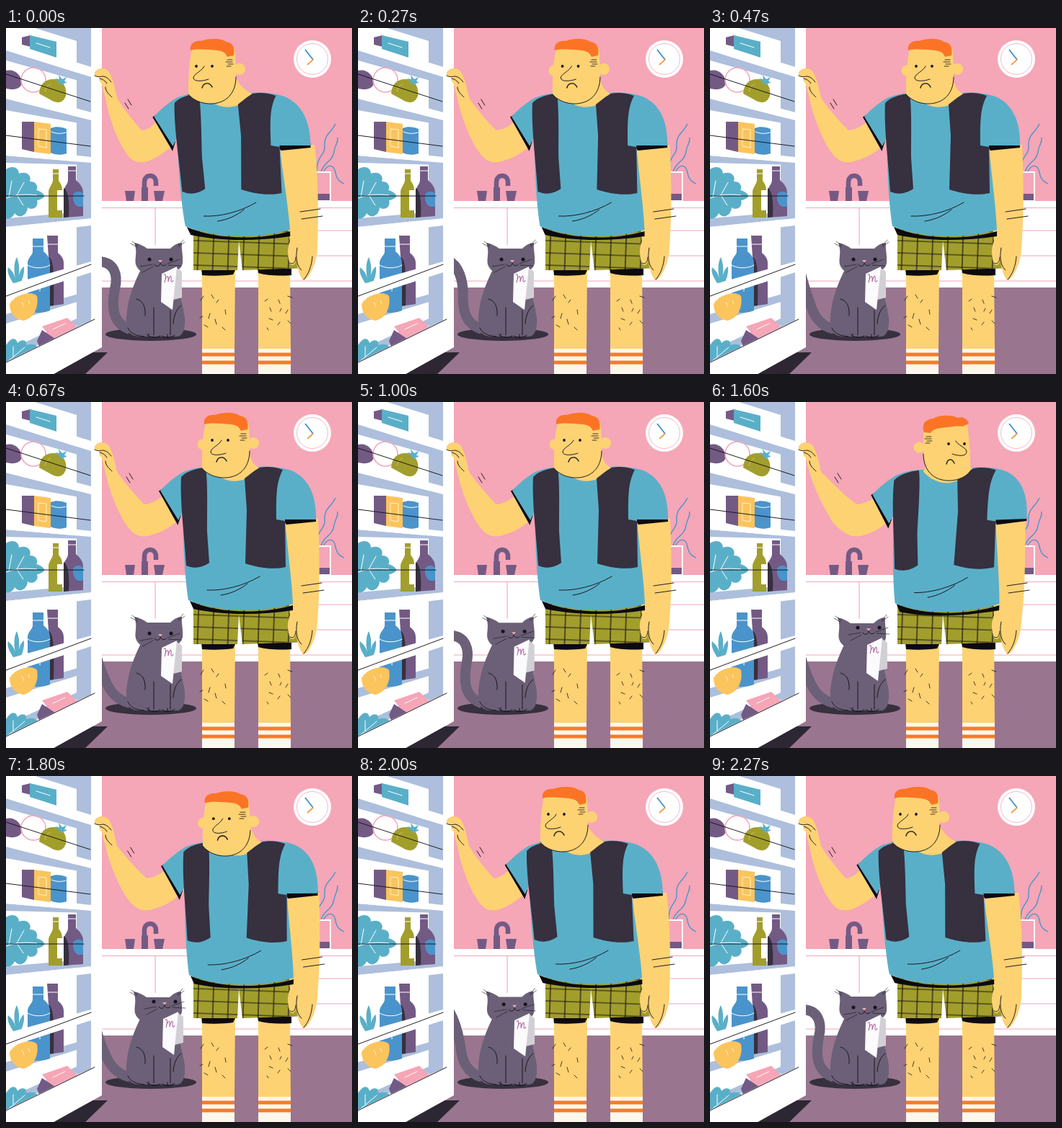
Write an HTML page that moves like this. It is 480 by 480 pixels and loops after 2.34 s.

```html
<!DOCTYPE html>
<html lang="en">
<head>
<meta charset="utf-8">
<title>Kitchen</title>
<style>
  html, body { margin: 0; width: 100%; height: 100%; overflow: hidden; background: #f5a6b7; }
  svg { display: block; width: 100vw; height: 100vh; }
  .ink { fill: none; stroke: #17131b; stroke-width: .95; stroke-linecap: round; stroke-linejoin: round; }
  .skin { fill: #fdd273; }
  .teal { fill: #5aafc8; }
  .dark { fill: #36303f; }
  .plum { fill: #735a85; }
  .olive { fill: #a29e2c; }
  .blue { fill: #4a94cb; }
  .ice { fill: #adbfdc; }
  .fur { fill: #6b6077; }
  .white { fill: #fff; }
  .pinkline { fill: none; stroke: #f5a6b7; stroke-width: 1.1; }
  .whiteline { fill: none; stroke: #fff; stroke-width: 1; stroke-linecap: round; }
</style>
</head>
<body>
<svg viewBox="0 0 480 480">
  <defs>
    <pattern id="plaid" width="21" height="17" patternUnits="userSpaceOnUse" patternTransform="translate(264 294) rotate(2)">
      <rect width="21" height="17" fill="#a29e2c"/>
      <path d="M0,1H21M3,0V17" stroke="#17131b" stroke-width="1.2"/>
    </pattern>
  </defs>

  <!-- room -->
  <rect width="480" height="480" fill="#f5a6b7"/>
  <rect y="240" width="480" height="120" class="white"/>
  <rect y="360" width="480" height="120" fill="#99758f"/>
  <path class="pinkline" d="M130,249.500H480M207,250V301M130,351H480M425,281H480M425,316H480"/>
  <circle cx="425" cy="43" r="26" class="white"/>
  <circle cx="425" cy="43" r="21.5" class="pinkline" style="stroke-width:.8"/>
  <path d="M415,30L426,44" stroke="#4a94cb" stroke-width="2"/>
  <path d="M426,44L418,51" stroke="#f0a04b" stroke-width="2"/>
  <g class="plum">
    <path d="M165,226H179L177,240H167Z M205,226H220L217,240H207Z M188,221H197V240H188Z"/>
    <path d="M192,224V214C192,202 208,202 208,214V219" fill="none" stroke="#735a85" stroke-width="6.5"/>
  </g>
  <g fill="none" stroke="#4a94cb" stroke-width="1.4">
    <path d="M431,200C431,175 443,178 442,163C441,148 451,146 457,133"/>
    <path d="M437,200C440,186 452,187 455,172C457,160 461,160 460,152"/>
    <path d="M440,200C447,187 455,190 457,200C459,212 465,214 469,216"/>
  </g>
  <path d="M424,200H450V240H424Z" fill="#f5a6b7" stroke="#fff" stroke-width="2"/>
  <rect x="426" y="230" width="23" height="9" class="plum"/>

  <!-- cat -->
  <ellipse cx="201" cy="425" rx="63" ry="9" class="dark"/>
  <path id="tail" fill="none" stroke="#6b6077" stroke-width="14"/>
  <path class="fur" d="M187,335C176,358 166,382 167,414C168,424 176,428 186,428H238C246,427 249,416 248,402C246,385 240,372 236,330Z"/>
  <path class="ink" d="M205,388V426M228,392V426M181,376C190,378 194,387 193,399M195,425C200,430 208,431 214,427M217,427C222,431 229,430 234,426M243,385C236,390 233,399 232,410M169,416C173,424 180,427 192,428M198,424v4M224,425v4"/>
  <g id="catHead">
    <path class="fur" d="M178,298C184,299 191,302 196,306H228C233,301 238,298 244,298C243,307 246,316 245,326C243,337 229,344 212,344C195,344 183,338 180,328C178,319 183,312 178,298Z"/>
    <path class="ink" style="stroke-width:.6" d="M173,299l9,5M175,296l8,6M248,297l-8,6M246,294l-7,8"/>
  </g>
  <g id="catFace">
    <circle cx="199" cy="321" r="2.5" fill="#17131b"/><circle cx="229" cy="321" r="2.5" fill="#17131b"/>
    <path d="M211,322H217L214,325.500Z" fill="#f5a6b7"/>
    <path class="ink" style="stroke-width:.9" d="M214,326C214,331 208,332 206,328M214,326C215,330 220,331 222,328"/>
    <path class="ink" style="stroke-width:.6" d="M203,328L186,331M204,331L189,339M224,327L241,321M225,329L243,330"/>
  </g>
  <g id="note">
    <path d="M236,332L244,338V374L232,377Z" fill="#d2d0d6"/>
    <path d="M216,341L237,331L231,391L215,380Z" fill="#fbfafc"/>
    <path d="M219,343C221,339 223,343 220,353C222,344 226,340 225,352C227,343 230,341 229,350C229,353 231,353 232,350" fill="none" stroke="#b26aa5" stroke-width="1.1"/>
  </g>

  <!-- fridge door -->
  <path d="M65,480L100,450H141L110,480Z" fill="#2d2733"/>
  <path class="white" d="M0,0H133V443L66,480H0Z"/>
  <path class="ice" d="M98,0H118V406L98,415Z"/>
  <path class="ice" d="M40,0H98V18Z M0,31L118,68V78L0,45Z M0,98L118,128V135L0,114Z M0,177L118,187V190L0,187Z M0,264L118,254V264L0,276Z M0,397L118,364V374L0,410Z M0,448L118,394V402L0,462Z"/>
  <path class="white" d="M0,17L118,54V68L0,31Z M0,85L118,117V128L0,98Z M0,166L118,179V187L0,177Z M0,276L118,264V274L0,288Z"/>
  <g>
    <path class="plum" d="M22,13L34,10V26L22,23Z"/>
    <path class="teal" d="M33,10L70,19V41L33,29Z"/>
    <path class="whiteline" d="M42,21L61,27"/>
    <path class="plum" d="M0,59C12,56 21,65 22,76C21,84 12,87 0,84Z"/>
    <circle cx="38" cy="72" r="17" fill="none" stroke="#f5a6b7" stroke-width="1.600"/>
    <path class="olive" d="M46,91C47,76 56,70 68,71C79,73 85,82 83,94C80,102 75,105 66,102Z"/>
    <path class="teal" d="M77,79L68,70L74,71L73,65L78,71L84,68L81,74L85,75Z"/>
    <path d="M54,88C55,83 58,79 62,78" fill="none" stroke="#d0c65f"/>
    <path class="plum" d="M22,130H39V172L22,168Z"/>
    <path d="M39,130L62,133V175L39,172Z" fill="#fbc45c"/>
    <path d="M45,140L56,141V166L45,164Z" fill="none" stroke="#fff3c9"/>
    <path class="blue" d="M62,139C68,136 78,137 84,140V174C76,177 68,176 62,173Z"/>
    <path class="whiteline" d="M63,144C70,147 77,147 83,145"/>
    <path class="teal" d="M0,196C8,190 18,193 18,202C29,198 36,205 33,213C43,212 45,222 42,225C48,226 54,231 53,234C48,239 43,239 43,239C46,248 37,254 30,249C29,261 18,265 12,257C9,264 3,265 0,264Z"/>
    <path class="whiteline" d="M0,236C14,231 27,230 43,232M15,232L25,214M15,232L24,246M4,234L8,212"/>
    <path class="olive" d="M65,196H73V212C78,218 78,222 78,228V263H59V228C59,221 64,218 65,212Z"/>
    <rect x="71" y="225" width="8" height="28" class="white"/>
    <path class="plum" d="M86,192H97V211C104,217 107,222 107,229V261L80,263V228C80,220 86,217 86,211Z"/>
    <path class="dark" d="M80,222C87,225 88,245 87,262L80,263Z"/>
    <path class="blue" d="M93,231C98,225 104,226 107,230V247C99,251 92,244 93,231Z"/>
    <path class="whiteline" d="M65,202H73M86,198H97"/>
    <path class="teal" d="M13,358C4,346 1,338 3,332C10,338 12,343 13,348C10,333 12,323 15,318C19,328 19,338 17,348C18,340 21,333 25,331C26,342 22,352 17,359Z"/>
    <path class="plum" d="M57,288H72V312C77,316 80,320 80,326V383L59,386V318Z"/>
    <path class="dark" d="M60,318C66,322 67,345 66,385L58,386Z"/>
    <path class="blue" d="M37,292H52V310C58,315 61,319 61,327V392C51,396 38,396 30,392V326C30,319 37,315 37,310Z"/>
    <path class="whiteline" d="M30,329C38,334 52,334 61,329M37,303H52M57,300H72M47,345V365"/>
    <path d="M5,383C12,370 35,363 43,372C46,388 38,403 24,406C13,404 5,396 5,383Z" fill="#fbc45c"/>
    <path d="M22,380L25,387M31,378L33,383" stroke="#fff3c9"/>
  </g>
  <path class="white" d="M0,357L118,324V339L0,377Z"/>
  <g>
    <path d="M50,414L85,402L100,416L66,434Z" fill="#f5a6b7"/>
    <path class="plum" d="M50,419L68,431L46,442L43,434Z"/>
    <path class="whiteline" d="M65,418L82,410"/>
    <path class="teal" d="M0,440C8,428 14,430 16,437C23,430 30,434 28,440C37,437 43,440 46,445L0,470Z"/>
    <path class="whiteline" d="M2,463L26,443M10,456V442"/>
  </g>
  <path class="white" d="M0,463L124,403V447L66,480H0Z"/>
  <path class="ink" d="M0,64L117,102M0,149L117,164M0,233H108M0,372L118,328M0,464L123,404"/>

  <!-- legs -->
  <path class="skin" d="M272,330H318L317,446H272Z M350,330H394L395,446H350Z"/>
  <path d="M271,334H319L315,342C300,344 285,344 272,343Z M349,334H396V343C380,344 365,344 350,340Z" fill="#0d0a10"/>
  <path d="M272,445H317V480H272Z M350,445H395V480H350Z" fill="#fbf7ec"/>
  <path d="M272,453H317M350,453H395M272,464H317M350,464H395" stroke="#fb7a26" stroke-width="5"/>
  <path class="ink" style="stroke-width:.8" d="M270,378l4,-6M285,370l3,5M283,396l-2,7M290,404l2,7M304,391l1,6M292,381l3,-4M300,415l4,4M269,402l4,-2M275,412l5,3M359,379l4,-3M366,388l2,5M378,377l2,5M391,372l6,2M388,396l3,-5M365,403l5,2M377,412l3,-4M391,406l4,4M362,416l2,3M380,393l2,-4"/>
  <path d="M260,278L260,336H321L323,295L328,336L413,333L398,278Z" fill="url(#plaid)"/>

  <!-- man -->
  <path id="armR" class="skin"/>
  <path class="ink" d="M404,305C401,320 404,331 410,336M413,349C420,341 424,330 425,317M394,326C399,329 402,324 402,318"/>
  <path id="creases" class="ink" d="M410,255L438,251M412,265L441,261"/>
  <path id="armL" class="skin"/>
  <path class="skin" d="M123,62C125,56 134,54 140,58C147,64 150,78 154,97L136,91C134,85 135,79 132,76C129,75 130,70 130,68C125,68 122,67 123,62Z"/>
  <path class="ink" d="M123,66C128,69 132,67 135,67C140,68 143,71 146,75M130,70C134,71 138,73 140,77M138,82C138,88 143,92 147,96"/>
  <path id="ticks" class="ink" d="M167,104l5,8M171,99l5,8"/>
  <g id="torso">
    <path d="M255,276C290,292 350,296 398,282V289C350,296 300,296 260,287Z" fill="#0d0a10"/>
    <path d="M214,124L238,167L241,158L219,121Z" fill="#0d0a10" stroke="#0d0a10" stroke-width="3"/>
    <path d="M380,160H430V166L389,170Z" fill="#0d0a10"/>
    <path class="teal" d="M290,91C270,89 256,93 246,97C234,104 222,114 214,123L239,164L246,150C245,200 249,250 253,275C290,291 350,294 398,280C397,250 390,200 387,163H430C431,134 422,99 385,92C370,89 358,89 348,90Z"/>
    <path class="ink" d="M279,261C302,262 330,255 352,242M298,268C312,266 325,260 335,252"/>
    <path id="neck" class="skin"/>
    <path class="dark" d="M243,104C250,96 264,92 277,91C280,110 279,150 279,180L282,223C270,231 260,231 250,227C248,190 241,140 243,104Z"/>
    <path class="dark" d="M331,106C340,99 346,94 352,91C362,89 374,90 384,94C374,112 375,135 375,163L387,165L388,229C370,233 350,230 332,224L334,150Z"/>
  </g>
  <g id="head">
    <circle id="earL" cy="59" r="7.500" class="skin"/>
    <circle id="earR" cy="57" r="8" class="skin"/>
    <path id="skull" class="skin"/>
    <path id="jaw" class="ink"/>
    <path id="hair" fill="#fb7426"/>
    <path id="burns" class="ink" style="stroke-width:.8" d="M0,44h7M-2,47h9M1,50h7M-1,53h6"/>
    <g id="eyes" fill="#17131b"><circle cx="286" cy="53" r="1.900"/><circle cx="308" cy="53" r="1.900"/></g>
    <path id="nose" class="ink" style="fill:#fdd273"/>
    <path id="mouth" class="ink" style="stroke-width:1.4"/>
  </g>
</svg>
<script>
const LOOP = 2340, STEP = LOOP / 35;
const $ = id => document.getElementById(id);
const set = (id, name, value) => $(id).setAttribute(name, value);
const move = (id, x, y = 0) => set(id, 'transform', `translate(${x} ${y})`);
const lerp = (a, b, u) => a + (b - a) * u;
const ease = u => (1 - Math.cos(Math.PI * Math.min(1, Math.max(0, u)))) / 2;

// Eased value from a list of [start, end, value] moves.
function track(t, from, moves) {
  return moves.reduce((v, [a, b, to]) => lerp(v, to, ease((t - a) / (b - a))), from);
}

// Blend two paths with the same commands.
function morph(a, b, u) {
  const num = /-?[\d.]+/g, ends = b.match(num);
  let i = 0;
  return a.replace(num, n => lerp(+n, +ends[i++], u).toFixed(2));
}

// Each part facing left, then right.
const shapes = {
  skull: ['M278,24C274,40 272,60 272,92C282,104 300,107 312,104C330,100 338,85 338,62C338,50 337,40 337,34L336,28Z',
          'M276,28C274,40 274,50 274,62C274,85 282,100 300,104C312,107 330,104 339,92C340,75 337,50 336,34L334,24Z'],
  jaw: ['M272,92C282,104 300,107 312,104C330,100 338,85 338,68',
        'M274,68C274,85 282,100 300,104C312,107 330,104 339,92'],
  hair: ['M275,31C273,20 284,17 290,18C300,14 318,14 324,19C334,20 337,28 335,38L326,40C323,33 318,32 312,31C300,30 285,28 275,31Z',
         'M275,38C271,26 277,20 288,19C294,14 312,13 322,18C328,16 334,18 337,26L328,30C322,29 315,30 308,31C298,32 288,32 284,39Z'],
  nose: ['M299,53C297,59 284,64 284,69C284,75 297,74 305,71',
         'M319,50C321,56 334,59 334,65C334,72 322,71 314,68'],
  mouth: ['M292,83C294,75 303,75 306,82', 'M306,82C308,74 314,74 317,81']
};

const tailUp = 'M128,324C150,324 156,342 151,362C146,388 148,410 172,418';
const tailLow = 'M118,318C122,340 127,364 136,382C143,400 152,413 172,418';

// Both lean tracks run from -1 (toward the fridge) over 0 (upright) to 1 (away).
const lean = (t, back) => track(t, -1, [[40, 330, 0], [1080, 1300, 1], back]);

function drawBody(p, headX) {
  const turn = Math.max(0, p), back = Math.min(0, p);
  const skew = .03 * back + .05 * turn, shift = 4 * back + 3.5 * turn;
  const s = 9 * back + 11 * turn, e = 4 * back + 12 * turn, m = e * .5;
  const drop = -.03 * turn, tip = 5 * turn;

  set('torso', 'transform', `matrix(1 ${drop} ${-skew} 1 ${shift + 280 * skew} ${-400 * drop})`);
  const nx = headX - s;
  set('neck', 'd', `M${280 + nx},75L${337 + nx},65C${338 + nx / 2},80 344,88 351,91C335,114 305,117 283,93Z`);
  set('armL', 'd', `M136,88C140,112 ${152 + m},148 ${166 + m},169C${177 + e},187 ${190 + e},189 ${203 + e},184
    C${218 + s},180 ${230 + s},172 ${242 + s},162L${222 + s},${126 + tip}C${212 + s},136 ${202 + e},141 ${192 + e},142
    C${181 + m},131 ${166 + m},114 154,97L146,85Z`);
  const a = 5 * p, b = 2 * p;
  set('armR', 'd', `M${386 + a},162C${388 + a},220 ${390 + b},260 394,296C389,305 391,320 394,327
    C398,332 402,326 403,322C404,335 408,346 413,350C420,349 432,325 432,305C${436 + b},260 ${435 + b},200 ${433 + a},162Z`);
  move('creases', b);
  move('ticks', m);
}

function drawHead(p, headX, dip) {
  const turn = Math.max(0, p), back = Math.min(0, p);
  move('head', headX, 4 * turn + dip);
  for (const id in shapes) set(id, 'd', morph(...shapes[id], turn));
  move('nose', 5 * back);
  move('eyes', 3 * back + 23 * turn, turn);
  move('mouth', back);
  move('burns', lerp(326, 278, turn));
  set('earL', 'cx', 273 - 9 * back - 5 * turn);
  set('earR', 'cx', 343 - 15 * turn);
}

function drawMan(t) {
  const body = lean(t, [1640, 2040, -1]), head = lean(t, [1620, 2000, -1]);
  const headX = head < 0 ? 19 * head : 22 * head;
  drawBody(body, headX);
  drawHead(head, headX, 6 * Math.sin(Math.PI * ease((t - 1620) / 380)));
}

function drawCat(t) {
  const low = track(t, 0, [[40, 600, 1], [690, 1040, 0], [1080, 1620, 1], [1800, 2270, 0]]);
  const look = track(t, 0, [[870, 1200, 1], [1870, 2150, 0]]);
  set('tail', 'd', morph(tailUp, tailLow, low));
  move('catHead', -look, look);
  move('catFace', 6 * look, -8 * look);
  move('note', 2 * look, -4 * look);
}

function frame(now) {
  // Steps begin on whole hundredths, slightly ahead of the even grid.
  const t = Math.floor((now % LOOP + 7) / STEP) * STEP;
  drawMan(t);
  drawCat(t);
  requestAnimationFrame(frame);
}
frame(0);
</script>
</body>
</html>
```
